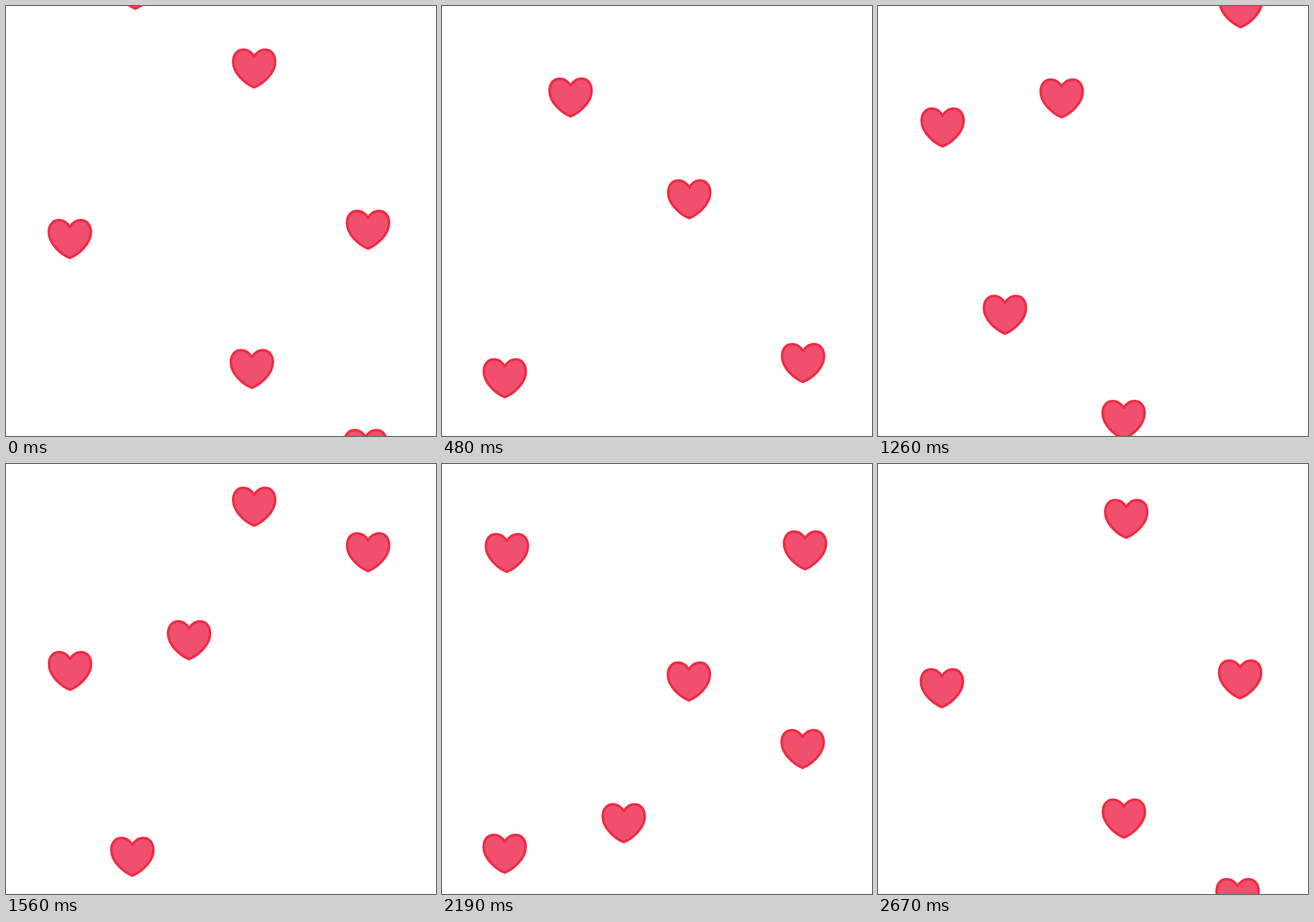
An HTML page without scripts that plays this animation: 748 px wide and 748 px high, repeating every 2700 ms.

```html
<!DOCTYPE html>
<html lang="en">
<head>
<meta charset="utf-8">
<title>Falling hearts</title>
<style>
  @property --t {
    syntax: "<number>";
    inherits: false;
    initial-value: -1350;
  }

  html, body {
    margin: 0;
    width: 100%;
    height: 100%;
    overflow: hidden;
    background: #fff;
  }

  svg {
    display: block;
    width: 100%;
    height: 100%;
  }

  #heart {
    fill: #f0506d;
    stroke: #f02d45;
    stroke-width: 4.5;
    stroke-linejoin: round;
  }

  /* Each heart follows a slice of a sine wave: --t is the time in ms around
     the moment (--step + --late) when it passes --mid at full speed. */
  .fall {
    --mid: 490;
    --drop: calc(var(--reach) * sin(var(--rate) * (var(--t) - var(--late)) / 1000));
    transform: translate(
      calc((var(--x) - 0.0073 * var(--drop)) * 1px),
      calc((var(--mid) + var(--drop)) * 1px));
    animation: tick 2700ms steps(90) infinite;
    animation-delay: calc(var(--step) * 30ms - 4052ms);
  }

  @keyframes tick {
    from { --t: -1350; }
    to { --t: 1350; }
  }
</style>
</head>
<body>
<svg viewBox="0 0 748 748">
  <defs>
    <path id="heart" d="M0-2.5C-14-8-36.5-26-36.5-47C-36.5-60-29-68-19-68C-11-68-4-63 0-56C4-63 11-68 19-68C29-68 36.5-60 36.5-47C36.5-26 14-8 0-2.5Z"/>
  </defs>
  <use href="#heart" class="fall" style="--x:221.4; --step:37; --late:5; --reach:656; --rate:.763; --mid:500"/>
  <use href="#heart" class="fall" style="--x:429.2; --step:24; --late:-2; --reach:769; --rate:.65"/>
  <use href="#heart" class="fall" style="--x:110.7; --step:93; --late:7; --reach:728; --rate:.7"/>
  <use href="#heart" class="fall" style="--x:629.3; --step:94; --late:15; --reach:748; --rate:.65"/>
  <use href="#heart" class="fall" style="--x:627.7; --step:71; --late:-14; --reach:878; --rate:.63"/>
  <use href="#heart" class="fall" style="--x:429.1; --step:77; --late:-7; --reach:877; --rate:.57; --mid:470"/>
  <use href="#heart" class="fall" style="--x:110.7; --step:58; --late:6; --reach:710; --rate:.72"/>
  <use href="#heart" class="fall" style="--x:317.4; --step:62; --late:-7; --reach:771; --rate:.66"/>
</svg>
</body>
</html>
```
